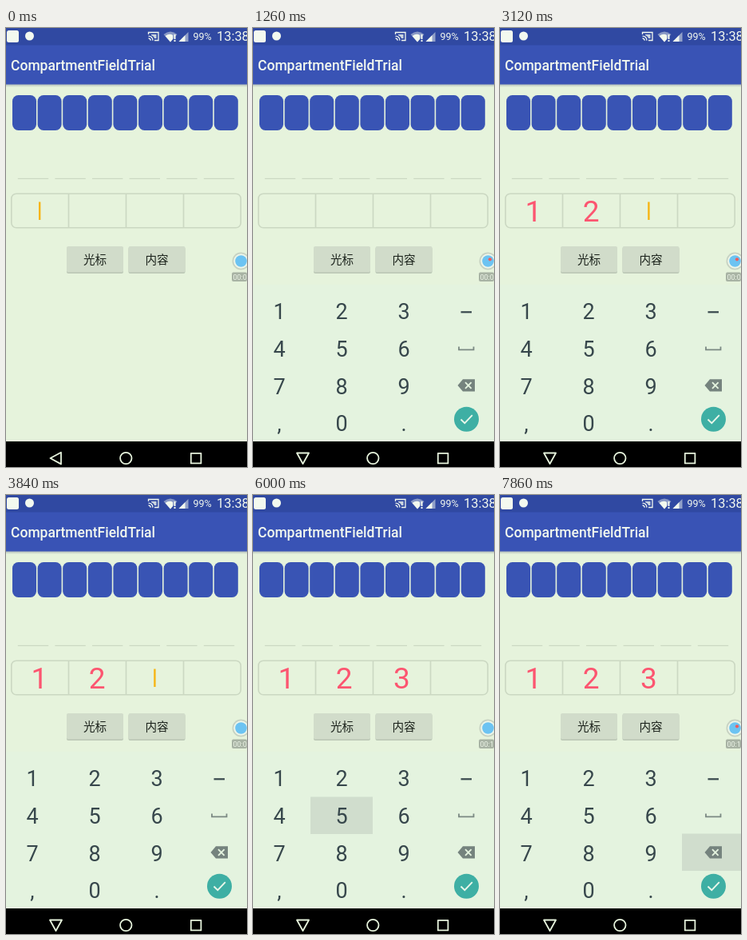
Write an HTML page that moves like this. It is 302 by 549 pixels and loops after 8000 ms.

```html
<!DOCTYPE html>
<html lang="en">
<head>
<meta charset="utf-8">
<title>Separated input</title>
<style>
  html, body { margin: 0; width: 100%; height: 100%; overflow: hidden; background: #e6f3dc; }
  svg { display: block; width: 302px; height: 549px; }
  text { font-family: Roboto, sans-serif; }
  .cjk { font: 14.6px "Noto Sans CJK SC", "Noto Sans CJK", sans-serif; fill: #1c231c; }
  .mid { text-anchor: middle; }
  .key { font-size: 27px; fill: #37474c; }
  .digit { font-size: 37px; fill: #fc5570; }
  .line { fill: none; stroke: #cbd8c2; stroke-width: 1.6; }
  .nav { fill: none; stroke: #e6f3dc; stroke-width: 1.8; stroke-linejoin: round; }
</style>
</head>
<body>
<svg id="stage" width="302" height="549" viewBox="0 0 302 549">
  <defs>
    <linearGradient id="shade" x2="0" y2="1">
      <stop offset="0" stop-color="#a9b5b4"/>
      <stop offset="1" stop-color="#e6f3dc"/>
    </linearGradient>
  </defs>
  <rect width="302" height="549" fill="#e6f3dc"/>
  <rect y="70" width="302" height="4" fill="url(#shade)"/>
  <rect y="21" width="302" height="49.5" fill="#3953b5"/>
  <rect width="302" height="21.5" fill="#3049a2"/>

  <g fill="#f3f9ef">
    <rect x="1" y="3" width="15" height="15" rx="2.5"/>
    <circle cx="29.5" cy="10" r="5.5"/>
    <path d="M178.5 8V5.5H191V15.5H186M178.5 10.2Q183.6 10.4 184 15.6M178.5 12.8Q181 13 181.3 15.6" fill="none" stroke="#f3f9ef" stroke-width="1.3"/>
    <path d="M182 8h6.5v5h-2.3Q185 10 182 9z" opacity=".8"/>
    <path d="M197.5 8Q206 .8 214.5 8L206 17.5z" opacity=".45"/>
    <path d="M199.5 10Q205 6 209 9V14L206 17.5z"/>
    <path d="M210.5 8h2v6h-2zM210.5 15h2v2h-2z"/>
    <path d="M228.5 5V17H216.5z" opacity=".5"/>
    <path d="M224.5 9V17H216.5z"/>
    <text x="234.5" y="15" font-size="12.5">99%</text>
    <text x="264" y="16.3" font-size="16.4">13:38</text>
    <text x="6" y="53" font-size="17.5" font-weight="500">CompartmentFieldTrial</text>
  </g>

  <g id="fields"></g>
  <rect class="line" x="6.8" y="207.3" width="287.4" height="42.4" rx="6"/>
  <path class="line" d="M78.5 207.5V249.5M150.5 207.5V249.5M222.5 207.5V249.5"/>
  <g id="digits"></g>
  <rect id="cursor" y="217.5" width="2.4" height="22.5" fill="#f7b515"/>

  <g id="buttons"></g>

  <g id="keyboard">
    <rect y="321" width="302" height="197" fill="#e4f3df"/>
    <rect id="press" width="78" height="46.5" fill="#d0ddcd"/>
    <g id="keys"></g>
    <path d="M260.5 355.3H274" stroke="#37474c" stroke-width="2.2"/>
    <path d="M258 398.5V402.3H276.5V398.5" fill="none" stroke="#7b8983" stroke-width="1.8"/>
    <path d="M256.5 447L263 439.2H278V454.6H263z" fill="#75837e"/>
    <path d="M266 443.2L273.6 450.8M273.6 443.2L266 450.8" stroke="#e4f3df" stroke-width="1.9"/>
    <circle cx="267.5" cy="489.2" r="15.5" fill="#3eafa4"/>
    <path d="M260.5 489.5L265.3 494.2L274.8 484.2" fill="none" stroke="#eaf7ea" stroke-width="1.9"/>
  </g>

  <g>
    <circle cx="294.5" cy="291.5" r="11" fill="#c7d2c2"/>
    <circle cx="294.5" cy="291.5" r="9.3" fill="#edf6ea"/>
    <circle cx="294.5" cy="291.5" r="7.3" fill="#6cc3f2"/>
    <circle id="rec" cx="297" cy="289.3" r="2.1" fill="#ee5c5c"/>
    <rect x="283" y="305.5" width="19" height="11.5" rx="2" fill="#a8b3a4"/>
    <text id="clock" x="284.5" y="314.6" font-size="9" fill="#edf5e8"></text>
  </g>

  <rect y="517" width="302" height="32" fill="#000"/>
  <path id="back" class="nav"/>
  <circle class="nav" cx="150.3" cy="538" r="7.2"/>
  <rect class="nav" x="231.8" y="531.8" width="12.6" height="12.6"/>
</svg>
<script>
const LOOP = 8000;
const $ = id => document.getElementById(id);

// Each table holds [start in ms, value].
const typed = [[0, ""], [2640, "1"], [2880, "12"], [4320, "123"], [6240, "1235"], [7860, "123"]];
const pressed = [[0, ""], [2400, "1"], [2640, ""], [2700, "2"], [2880, ""],
  [4200, "3"], [4320, ""], [6000, "5"], [6240, ""], [7860, "<"]];
const cursorFlips = [0, 390, 840, 1260, 1860, 2340, 2880, 3360, 3840, 4320, 4740, 5160, 5520, 6000];
const recFlips = [180, 720, 1200, 1620, 2040, 2340, 2640, 3300, 4200, 4620, 5040, 5460, 6240, 6540, 6960, 7320, 7680];
const keyRows = ["123-", "456_", "789<", ",0. "];

const at = (steps, t) => steps.filter(s => s[0] <= t).pop()[1];
const isOn = (flips, t) => flips.filter(f => f <= t).length % 2 === 1;
const show = (el, on) => el.setAttribute("visibility", on ? "inherit" : "hidden");
const put = (el, attrs) => { for (const k in attrs) el.setAttribute(k, attrs[k]); };

function add(parent, tag, attrs, text = "") {
  const el = document.createElementNS("http://www.w3.org/2000/svg", tag);
  put(el, attrs);
  el.textContent = text;
  return $(parent).appendChild(el);
}

for (let i = 0; i < 9; i++)
  add("fields", "rect", { x: 8 + i * 31.6, y: 84, width: 30, height: 44, rx: 7.5, fill: "#3954b4" });
for (let i = 0; i < 6; i++)
  add("fields", "rect", { x: 14.8 + i * 46.6, y: 187.8, width: 38.4, height: 1.2, fill: "#cbd8c2" });

["光标", "内容"].forEach((label, i) => {
  const x = 76 + i * 77.5;
  add("buttons", "rect", { x, y: 274, width: 71, height: 33, rx: 2, fill: "#bac6b4" });
  add("buttons", "rect", { x, y: 273, width: 71, height: 32.5, rx: 2, fill: "#d1dcca" });
  add("buttons", "text", { x: x + 35.5, y: 295, class: "cjk mid" }, label);
});

keyRows.forEach((row, r) => [...row].forEach((c, i) => {
  if (i < 3) add("keys", "text", { x: 33 + i * 78, y: 364.3 + r * 46.7, class: "key mid" }, c);
}));

const digits = [0, 1, 2, 3].map(i =>
  add("digits", "text", { x: 42 + i * 72.2, y: 241.5, class: "digit mid" }));

function draw(t) {
  const text = at(typed, t);
  digits.forEach((d, i) => { d.textContent = text[i] || ""; });
  put($("cursor"), { x: 41 + text.length * 72.1 });
  show($("cursor"), text.length < 4 && isOn(cursorFlips, t));

  const key = at(pressed, t);
  const row = keyRows.findIndex(r => key && r.includes(key));
  show($("press"), row >= 0);
  if (row >= 0) put($("press"), { x: -6 + keyRows[row].indexOf(key) * 78, y: 331 + row * 46.5 - (row === 2 ? 0.5 : 0) });

  const open = t >= 720;
  const p = Math.min(1, Math.max(0, (t - 720) / 480));
  put($("keyboard"), { transform: `translate(0 ${197 * (1 - p) ** 3})` });
  show($("keyboard"), open);
  put($("back"), { d: open ? "M55 531.5H70L62.5 545z" : "M69 530.8V545.4L55.5 538z" });

  show($("rec"), isOn(recFlips, t));
  $("clock").textContent = t < 5040 ? "00:0" : "00:1";
}

const start = performance.now();
function tick() {
  draw((performance.now() - start) % LOOP);
  requestAnimationFrame(tick);
}
tick();
</script>
</body>
</html>
```
